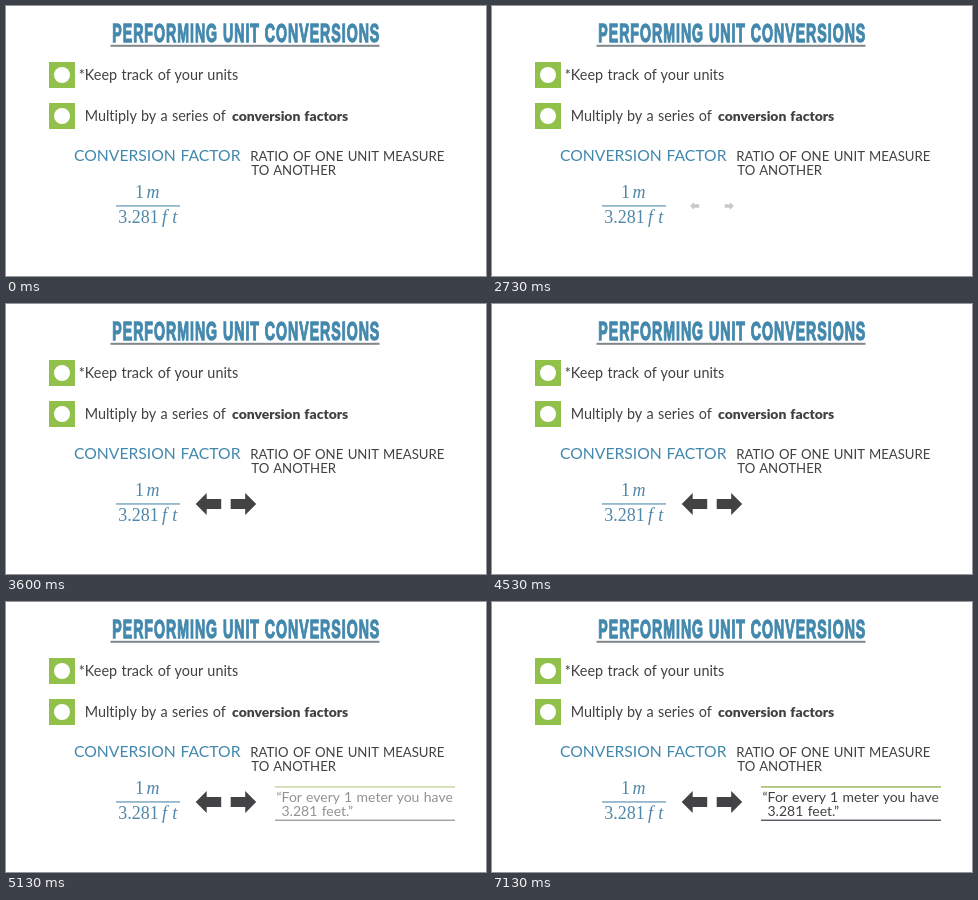
An HTML page that plays this animation: 480x270 px, repeating every 7.74 s.

```html
<!DOCTYPE html>
<html lang="en">
<head>
<meta charset="utf-8">
<title>Performing unit conversions</title>
<style>
  html, body { margin: 0; width: 100%; height: 100%; overflow: hidden; background: #fff; }
  svg { display: block; width: 480px; height: 270px; }
  text { font-family: Lato, "Open Sans", sans-serif; font-size: 14.4px; font-variant-ligatures: none; word-spacing: .8px; fill: #414143; }
  .title { font: bold 26px "Liberation Sans", Arial, sans-serif; letter-spacing: 1.8px; word-spacing: 0; fill: #4388ad; stroke: #4388ad; stroke-width: 1.4; }
  .strong { font-size: 13.9px; font-weight: 900; }
  .term { font-size: 15.7px; fill: #4388ad; }
  .caps { font-size: 13.2px; word-spacing: 1px; }
  .math { font-family: "Liberation Serif", "Times New Roman", serif; font-size: 18px; fill: #5088a9; }
  .var { font-style: italic; }
  #quote text { font-size: 14px; }
</style>
</head>
<body>
<svg viewBox="0 0 480 270">
  <defs>
    <g id="bullet">
      <rect x="-13" y="-13" width="26" height="26" fill="#91c14b"/>
      <circle r="8" fill="#fff"/>
    </g>
    <path id="arrow" d="M-13 0L-2-11V-5H12.5V5H-2V11Z" fill="#434345"/>
  </defs>

  <!-- condensed heading -->
  <text class="title" transform="translate(240.3 36) scale(.545 1)" text-anchor="middle">PERFORMING UNIT CONVERSIONS</text>
  <rect x="104.5" y="38.8" width="269" height="2" fill="#80878c"/>

  <use href="#bullet" x="56" y="69"/>
  <text x="72.7" y="74">*Keep track of your units</text>
  <use href="#bullet" x="56" y="110"/>
  <text x="78.7" y="115">Multiply by a series of</text>
  <text class="strong" x="226" y="115">conversion factors</text>

  <text class="term" x="68" y="155">CONVERSION FACTOR</text>
  <text class="caps" x="244.3" y="155">RATIO OF ONE UNIT MEASURE</text>
  <text class="caps" x="245.3" y="168.5">TO ANOTHER</text>

  <text class="math" x="129" y="192">1</text>
  <text class="math var" x="140.5" y="192">m</text>
  <rect x="110" y="199.4" width="64" height="1.1" fill="#5088a9"/>
  <text class="math" x="112.3" y="217">3.281</text>
  <text class="math var" x="156 166.3" y="217">ft</text>

  <g id="left"><use href="#arrow"/></g>
  <g id="right"><use href="#arrow"/></g>

  <g id="quote">
    <rect x="269" y="184.3" width="180" height="1.3" fill="#8fae4c"/>
    <text x="270.5" y="200">“For every 1 meter you have</text>
    <text x="275.5" y="213.5">3.281 feet.”</text>
    <rect x="269" y="217.6" width="180" height="1.3" fill="#4b4b55"/>
  </g>
</svg>
<script>
  const LOOP = 7740, STEP = 1000 / 15;
  const [left, right, quote] = ['left', 'right', 'quote'].map(id => document.getElementById(id));
  const progress = (t, from, to) => Math.min(1, Math.max(0, (t - from) / (to - from)));
  const backOut = p => 1 + 2.70158 * (p - 1) ** 3 + 1.70158 * (p - 1) ** 2;

  function pop(el, x, flip, t) {
    const scale = Math.max(0, backOut(progress(t, 2665, 3465)));
    el.setAttribute('transform', `translate(${x} 200) scale(${flip * scale} ${scale})`);
    el.setAttribute('opacity', progress(t, 2665, 2905));
  }

  function draw(now) {
    // the picture advances at 15 steps per second
    const t = Math.floor((now % LOOP + 4) / STEP) * STEP;
    pop(left, 202.7, 1, t);
    pop(right, 237.2, -1, t);
    quote.setAttribute('opacity', progress(t, 4867, 5333));
  }

  const start = performance.now();
  function tick() {
    draw(performance.now() - start);
    requestAnimationFrame(tick);
  }
  tick();
</script>
</body>
</html>
```
